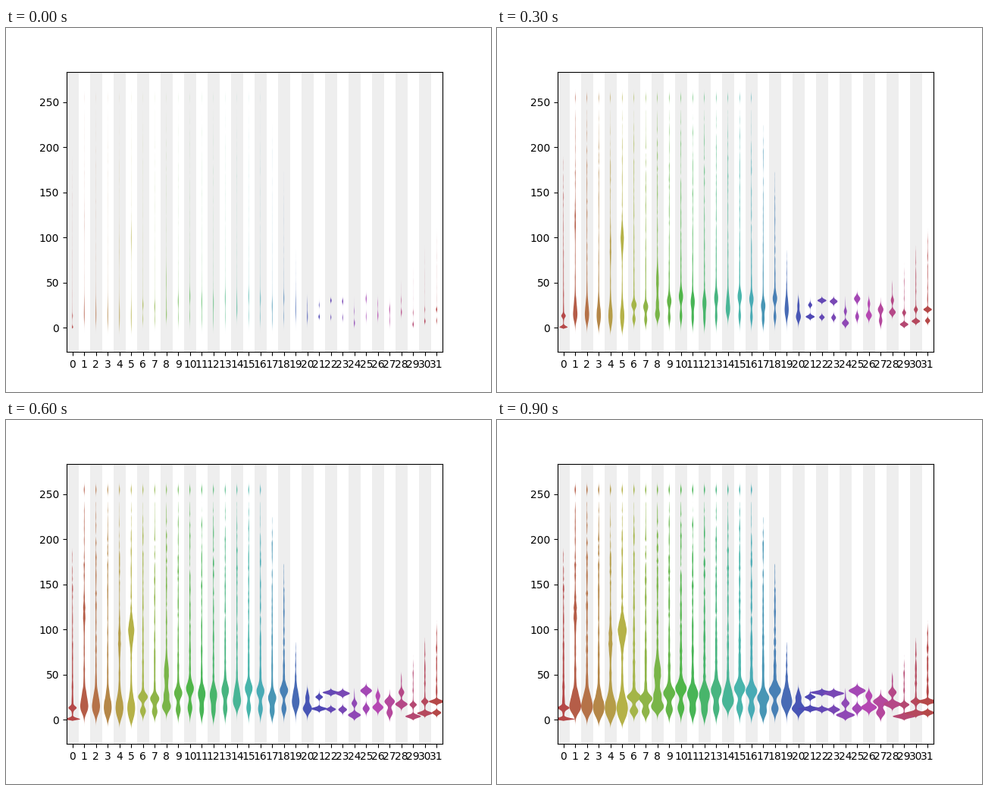
A matplotlib script that plays this animation: 640x480 px, repeating every 1000 ms.

```python
import colorsys

import matplotlib.pyplot as plt
import numpy as np
from matplotlib.animation import FuncAnimation
from matplotlib.patches import Polygon

COUNT = 32
FRAMES = 10
COLUMN_PX = 15.5
START = 0.5  # width of the first frame, in growth steps
FULL = 5.5   # growth at which profiles have their nominal pixel width

# Main mode of each column, and the few broad upper humps as column: (y, height).
PEAKS = [0, 13, 12, 10, 9, 8, 25, 23, 14, 29, 34, 28, 27, 32, 19, 34,
         31, 24, 32, 18, 12, 12, 30, 29, 5, 32, 13.5, 20, 17, 3.5, 7, 20]
HUMPS = {1: (118, 0.7), 4: (86, 1.0), 5: (99, 2.8), 8: (53, 1.9)}

rng = np.random.default_rng(5)
grid = np.arange(-14, 272, 0.5)


def bell(center, sigma, height):
    return height * np.exp(-0.5 * ((grid - center) / sigma) ** 2)


def spread(column):
    return np.interp(column, [0, 1, 5, 6, 12, 18, 19, 21, 22, 25, 27, 29],
                     [1.6, 6, 8, 3.8, 6.5, 5, 7, 1.5, 1.5, 2.8, 3.4, 1.7])


def tail(peak, top):
    """Thin upper tail that decays with height and breaks up near its top."""
    above = grid - peak
    fade = 0.35 + 0.9 * np.exp(-above / 45)
    ends = np.clip(above / 10, 0, 1) * np.clip((top - grid) / (0.3 * top), 0, 1) ** 0.5
    knots = np.arange(-16, 276, 4)
    noise = np.interp(grid, knots, rng.normal(size=knots.size))
    breaks = np.clip(1 + 0.6 * noise * grid / top, 0, 2)
    return min(1, top / 150) * fade * ends * breaks


def profile(column):
    """Half width of one violin in pixels; narrower modes stand wider."""
    peak, sigma = PEAKS[column], spread(column)
    height = 12 * sigma ** -0.6
    # High modes have a second lobe below, low modes a weaker one above.
    second, ratio = (0.38 * peak, 0.6) if peak >= 20 else (peak + 13, 0.4)
    shape = bell(peak, sigma, height) + bell(second, 1.1 * sigma, ratio * height)
    if column in HUMPS:
        y, rise = HUMPS[column]
        shape += bell(y, 11, rise)

    top = np.interp(column, [0, 1, 16, 17, 18, 19, 20, 27, 31],
                    [190, 242, 242, 225, 173, 86, 36, 34, 110])
    shape += tail(peak, top)
    if top > 240:
        shape += bell(255, 3, 0.45)
    floor = 1 - 1.5 * sigma
    return shape * np.clip((grid - floor) / sigma, 0, 1)


fig, ax = plt.subplots(figsize=(6.4, 4.8), dpi=100)
for column in range(0, COUNT, 2):
    ax.axvspan(column - 0.5, column + 0.5, color="#eeeeee", lw=0, zorder=0)

profiles = [profile(column) for column in range(COUNT)]
shapes = []
for column in range(COUNT):
    color = colorsys.hsv_to_rgb(column / (COUNT - 1), 0.6, 0.71)
    shape = Polygon([(0, 0), (0, 1), (1, 1)], fc=color, lw=0, zorder=1 + column / 100)
    shapes.append(ax.add_patch(shape))

ax.set(xlim=(-0.5, COUNT - 0.5), ylim=(-27.1, 284), xticks=range(COUNT))


def draw(frame):
    growth = (frame + START) / FULL / COLUMN_PX
    for column, (shape, half) in enumerate(zip(shapes, profiles)):
        x = np.concatenate((column - half * growth, (column + half * growth)[::-1]))
        y = np.concatenate((grid, grid[::-1]))
        shape.set_xy(np.column_stack((x, y)))
    return shapes


anim = FuncAnimation(fig, draw, frames=FRAMES, interval=100, repeat=True, repeat_delay=0)
plt.show()
```
